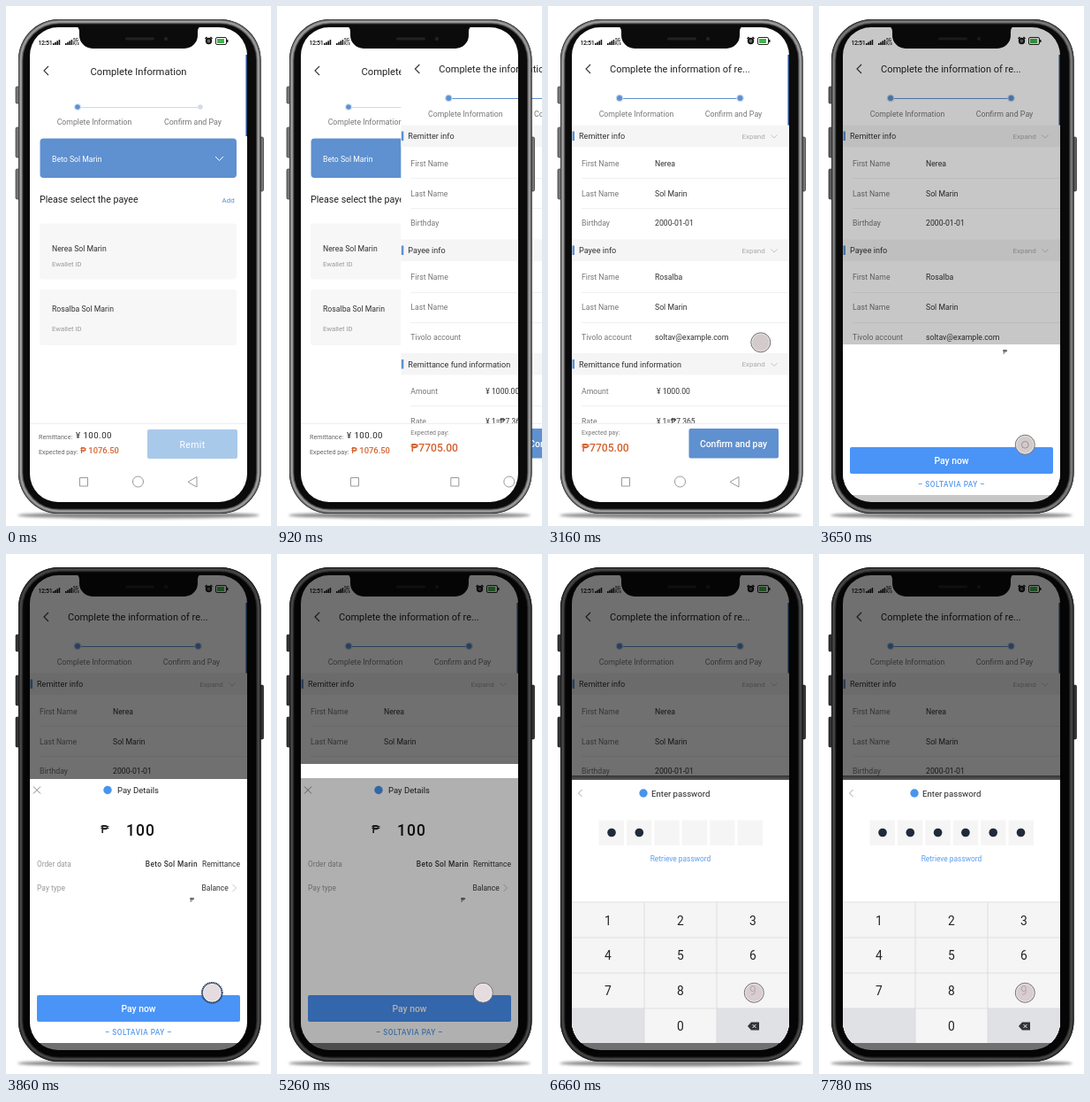
These frames come from a looping animation (300x587 px, 8000 ms). An HTML page:

```html
<!DOCTYPE html>
<html lang="en">
<head>
<meta charset="utf-8">
<title>Remittance demo</title>
<style>
html, body { margin: 0; width: 100%; height: 100%; overflow: hidden; background: #fff; }
svg { display: block; width: 300px; height: 587px; font-family: Roboto, Arial, sans-serif; }
</style>
</head>
<body>
<svg id="stage" viewBox="0 0 300 587"></svg>
<script>
const BLUE = '#5f90cf', ORANGE = '#d4622f';
const FULL = 'Beto Sol Marin', LAST = 'Sol Marin';

// markup helpers
const text = (x, y, s, size, fill = '#333', extra = '') =>
  `<text x="${x}" y="${y}" font-size="${size}" fill="${fill}" ${extra}>${s}</text>`;
const mid = 'text-anchor="middle"', end = 'text-anchor="end"', medium = 'font-weight="500"';
const rect = (x, y, w, h, fill, extra = '') =>
  `<rect x="${x}" y="${y}" width="${w}" height="${h}" fill="${fill}" ${extra}/>`;
const disc = (x, y, r, fill, extra = '') =>
  `<circle cx="${x}" cy="${y}" r="${r}" fill="${fill}" ${extra}/>`;
const line = (d, stroke, w = 1) =>
  `<path d="${d}" fill="none" stroke="${stroke}" stroke-width="${w}"/>`;
const round = (x, y, w, h, r) =>
  `M${x + r} ${y}h${w - 2 * r}a${r} ${r} 0 0 1 ${r} ${r}v${h - 2 * r}a${r} ${r} 0 0 1 ${-r} ${r}` +
  `h${2 * r - w}a${r} ${r} 0 0 1 ${-r} ${-r}v${2 * r - h}a${r} ${r} 0 0 1 ${r} ${-r}z`;

function statusBar() {
  let s = text(36.5, 43.5, '12:51', 7, '#111', medium + ' letter-spacing="-.4"');
  for (const x of [53, 67]) {
    for (let i = 0; i < 4; i++) s += rect(x + i * 2.2, 42 - i * 1.3, 1.6, 2 + i * 1.3, '#111');
  }
  return s + text(76, 40, '5G', 4.8, '#111', medium) + text(76, 44.3, 'K/s', 4.5, '#111', medium) +
    disc(229.5, 39.5, 2.8, '#666', 'stroke="#111" stroke-width="1.8"') +
    line('M225.5 37l2-2M233.5 37l-2-2', '#111', 1.4) +
    rect(237.5, 35.5, 12, 8, '#fff', 'rx="1.5" stroke="#222"') +
    rect(239, 37, 8, 5, '#3fb54a') + rect(250, 38, 1.5, 3, '#222');
}

const navBar = () =>
  line('M83.5 532.5h9v9.5h-9zM216 531.5v11.5l-10-5.7z', '#999') +
  disc(149.5, 537, 6, 'none', 'stroke="#999"');

const pageBase = backY => rect(27, 24, 246, 536, '#fff') + statusBar() + navBar() +
  rect(271.5, 55, 2, 92, '#244c86') + line(`M48 ${backY - 5}l-5 5 5 5`, '#333', 1.1);

function payeePage() {
  const card = (y, name, nameY, idY) => rect(38, y, 223, 63, '#f7f7f7', 'rx="3"') +
    text(52, nameY, name, 8.7) + text(52, idY, 'Ewallet ID', 7.7, '#999');
  return pageBase(73) + text(150, 77.5, 'Complete Information', 11.2, '#222', mid) +
    line('M81 114.5H220', '#cfd9e6') + disc(81, 114, 4, '#d5e4f5') + disc(81, 114, 2.8, BLUE) +
    disc(220, 114, 2.7, '#d3dbe5') +
    text(100, 134, 'Complete Information', 8.7, '#777', mid) +
    text(211.5, 134, 'Confirm and Pay', 8.9, '#777', mid) +
    rect(38.5, 149.5, 222.5, 44.5, BLUE, 'rx="4"') + text(52, 175.5, FULL, 8.7, '#fff') +
    line('M237 170l4.5 4.5 4.5-4.5', '#fff') +
    text(38, 222, 'Please select the payee', 10.7, '#222') + text(244.5, 221.5, 'Add', 8, BLUE) +
    card(245.5, 'Nerea ' + LAST, 277, 293.5) + card(320, 'Rosalba ' + LAST, 345, 367) +
    line('M27 471.5H273', '#eee') +
    text(37, 488.5, 'Remittance:', 7.2, '#666') +
    text(79, 488.3, '¥ 100.00', 9.6, '#222', 'letter-spacing=".5"') +
    text(37, 505.5, 'Expected pay:', 7.2, '#666') +
    text(84, 504.5, '₱ 1076.50', 9.4, ORANGE, medium) +
    rect(160, 478, 102, 33, '#a9c9ea', 'rx="2"') +
    text(211, 498.5, 'Remit', 10.5, '#fff', mid + ' letter-spacing=".4"');
}

const fields = [
  [180.5, 'First Name', 'Nerea'], [214.5, 'Last Name', LAST], [248, 'Birthday', '2000-01-01'],
  [309, 'First Name', 'Rosalba'], [343, 'Last Name', LAST],
  [377, 'Tivolo account', 'soltav@example.com']
];

function confirmPage() {
  const section = (y, name) => rect(27, y, 246, 24.5, '#f5f5f5') + rect(27.5, y + 7, 2.5, 10.5, BLUE) +
    text(35, y + 15.5, name, 9.1) + text(219.5, y + 15, 'Expand', 8, '#aaa') +
    line(`M252.5 ${y + 11}l3.5 3.5 3.5-3.5`, '#c4c4c4');
  let s = pageBase(71) + text(70, 75, 'Complete the information of re...', 11, '#222') +
    line('M81 104.5H218', BLUE);
  for (const x of [81, 217.5]) s += disc(x, 104, 4.3, '#c4d8f0') + disc(x, 104, 3, BLUE);
  s += text(100, 124.5, 'Complete Information', 8.7, '#777', mid) +
    text(210, 124.5, 'Confirm and Pay', 8.8, '#777', mid) +
    section(134.5, 'Remitter info') + section(263.5, 'Payee info') +
    section(392, 'Remittance fund information');
  for (const [y, label] of fields) {
    s += text(38, y, label, 8.7, '#777') + text(121, y, '', 8.7, '#333', 'class="value"');
  }
  for (const y of [194.5, 228.5, 323.5, 357.5, 451.5]) s += line(`M38 ${y}H273`, '#f0f0f0');
  return s + text(38, 437.5, 'Amount', 8.7, '#777') + text(123, 437.5, '¥ 1000.00', 8.6) +
    text(38, 471.5, 'Rate', 8.7, '#777') + text(123, 471.5, '¥ 1=₱7.365', 8.5) +
    rect(27, 471, 246, 46, '#fff') + line('M27 471.5H273', '#eee') +
    text(38, 484, 'Expected pay:', 7, '#777') + text(38, 502.7, '₱7705.00', 12.1, ORANGE, medium) +
    rect(159.5, 477, 101.5, 33.5, BLUE, 'rx="2"') +
    text(210, 498, 'Confirm and pay', 10.4, '#fff', mid + ' ' + medium);
}

const BUTTONS = [[11, 91, 19], [11, 137, 34], [11, 184, 34], [287, 148, 61]];

function phoneFrame() {
  let s = '';
  for (const [x, y, h] of BUTTONS) {
    s += rect(x, y, 4.5, h, '#777', 'rx="1.5" stroke="#333" stroke-width=".7"');
  }
  s += `<path fill="#0b0b0b" fill-rule="evenodd" d="${round(14, 15, 274.5, 558, 46)}${round(27, 24, 246, 536, 32)}"/>`;
  // metal rim, dark at its edges and bright along its middle
  const rim = round(16.7, 17.7, 269.1, 552.6, 43.5);
  for (const [w, c] of [[5.4, '#3a3a3a'], [4, '#666'], [2.6, '#8a8a8a'], [1, '#a8a8a8']]) s += line(rim, c, w);
  return s +
    '<path fill="#0b0b0b" d="M78 23q5 0 5 6v4a15 15 0 0 0 15 15h104a15 15 0 0 0 15-15v-4q0-6 5-6z"/>' +
    rect(135, 35.5, 33, 3, '#222', 'rx="1.5"') + disc(181, 37, 2.2, '#1b2230');
}

const paySheet = () => rect(27, 254, 246, 298, '#fff') +
  line('M31 262.5l8 8M39 262.5l-8 8', '#777', .9) +
  disc(115, 266.5, 4.7, '#4795ea') + text(126, 270, 'Pay Details', 9.5, '#222') +
  text(107, 315, '₱', 13, '#222', medium) +
  text(136, 318, '100', 17.5, '#111', medium + ' letter-spacing="1"') +
  text(35, 352.5, 'Order data', 8.3, '#999') +
  text(217, 352.5, FULL, 8.4, '#333', end + ' ' + medium + ' letter-spacing=".3"') +
  text(265, 352.5, 'Remittance', 8.5, '#333', end) +
  text(35, 380, 'Pay type', 8.5, '#999') + text(221.5, 380, 'Balance', 8.5) +
  line('M256.5 373l4 4-4 4', '#bbb', .9) + text(208, 393, '₱', 7, '#555', medium) +
  rect(35, 498, 230, 30, '#4a94f7', 'rx="2"') +
  text(150, 517, 'Pay now', 10.4, '#fff', mid + ' ' + medium) +
  text(150, 543, '– SOLTAVIA PAY –', 8.2, '#5b9cec', mid + ' ' + medium + ' letter-spacing=".5"');

function passwordSheet() {
  let s = rect(27, 255, 246, 297, '#fff') + line('M38.5 266l-4 4 4 4', '#999', .9) +
    disc(108, 270, 4.7, '#4795ea') + text(117, 274, 'Enter password', 9.6, '#222') +
    text(150, 347, 'Retrieve password', 8.4, '#5b9cec', mid) +
    rect(27, 393, 246, 159, '#f5f5f6') + rect(27, 513, 82, 39, '#dfe1e5') +
    rect(191, 513, 82, 39, '#dfe1e5') + rect(191, 473, 82, 39.5, '#d6d8dd', 'id="key"');
  for (let i = 0; i < 6; i++) {
    s += rect(57.5 + 31.4 * i, 300.5, 28.5, 28.5, '#f5f5f5') +
      disc(72 + 31.3 * i, 314.5, 4.8, '#1f2a3a', 'class="pin"');
  }
  s += line('M27 393H273M27 433H273M27 473H273M27 513H273M109 393V552M191 393V552', '#dcdcde', .9);
  for (let i = 0; i < 10; i++) {
    const col = i < 9 ? i % 3 : 1, row = Math.floor(i / 3);
    s += text(68 + 82 * col, 418.5 + 39.8 * row, (i + 1) % 10, 13.8, '#222', mid);
  }
  return s + '<path d="M226 533l4-4.5h9v9h-9z" fill="#333"/>' +
    line('M231.5 531l4 4M235.5 531l-4 4', '#fff', .9);
}

const stage = document.getElementById('stage');
stage.innerHTML = `<defs>
  <clipPath id="screen"><path d="${round(27, 24, 246, 536, 32)}"/></clipPath>
  <clipPath id="payClip"><rect id="payWipe" x="27" width="246"/></clipPath>
  <clipPath id="passClip"><rect id="topWipe" x="27" y="255" width="246"/><rect id="padWipe" x="27" y="361" width="246"/></clipPath>
  <linearGradient id="shade" x2="0" y2="1"><stop offset="0" stop-color="#333"/><stop offset="1" stop-color="#5c5c5c"/></linearGradient>
  <filter id="blur" x="-10%" y="-100%" width="120%" height="300%"><feGaussianBlur stdDeviation="1.5"/></filter>
  </defs>
  <ellipse cx="150" cy="575" rx="137" ry="3.6" fill="#888" filter="url(#blur)"/>
  <g>${payeePage()}</g><g id="confirm">${confirmPage()}</g>${phoneFrame()}
  <path id="dim" d="${round(14, 15, 274.5, 558, 46)}${BUTTONS.map(([x, y, h]) => round(x, y, x < 20 ? 3 : 4.5, h, 1)).join('')}"/>
  <g clip-path="url(#screen)">
    ${rect(27, 237, 246, 17, '#fff', 'id="band"')}
    <g clip-path="url(#payClip)">${paySheet()}</g>
    ${rect(27, 253, 246, 307, '#000', 'id="shadeOver"')}
    ${rect(27, 250, 246, 5, 'url(#shade)', 'id="edge"')}
    <g clip-path="url(#passClip)">${passwordSheet()}</g>
  </g>
  <g id="touch">${disc(0, 0, 11, '#ccc', 'id="tip" stroke="#757073"')}
  ${disc(0, 0, 9.9, 'none', 'stroke="#fff" stroke-opacity=".45"')}
  ${disc(0, 0, 0, 'none', 'id="ring"')}</g>`;

const $ = id => document.getElementById(id);
const values = [...document.querySelectorAll('.value')], pins = [...document.querySelectorAll('.pin')];
const set = (id, attrs) => { for (const k in attrs) $(id).setAttribute(k, attrs[k]); };
const clamp = (v, lo = 0, hi = 1) => Math.min(hi, Math.max(lo, v));
const ramp = (t, a, b) => clamp((t - a) / (b - a));
const within = (t, a, b) => t >= a && t < b;

const PULSES = [1340, 3580, 4140], PINS = [6450, 6660, 6870, 7080, 7360, 7710];
const PRESSES = [6450, 7080, 7360, 7710];

function draw(t) {
  set('confirm', {
    transform: `translate(${272 * (1 - ramp(t, 430, 1270))} 0)`,
    visibility: t < 500 ? 'hidden' : 'visible'
  });

  fields.forEach(([, , s], i) => {
    const a = i < 5 ? 1970 + 168 * i : 2810;
    values[i].textContent = s.slice(0, Math.round(s.length * ramp(t, a, a + (i < 5 ? 168 : 350))));
  });

  // first sheet rises while everything behind it darkens
  const pay = t < 3580 ? 0 : Math.min(298, 85 * (t - 3510) / 70);
  set('payWipe', { y: 552 - pay, height: pay });
  set('dim', { opacity: t < 3580 ? 0 : .56 * ramp(t, 3515, 3860) });
  set('band', { opacity: t < 5330 ? ramp(t, 4630, 4770) : 0 });

  // second sheet
  const over = t < 5260 ? 0 : Math.min(.73, .31 + .001 * (t - 5260));
  set('shadeOver', { opacity: over * (1 - ramp(t, 5960, 6100)) });
  set('edge', { opacity: t < 5330 ? 0 : 1 });
  const n = (t - 5540) / 70;
  set('topWipe', { height: clamp(36 * n, 0, 106) });
  set('padWipe', { height: clamp(16 + 88 * (n - 2), 0, 191) });
  pins.forEach((p, i) => p.setAttribute('opacity', t >= PINS[i] ? 1 : 0));
  set('key', { opacity: PRESSES.some(a => within(t, a, a + 70)) ? 1 : 0 });

  // touch pointer
  const p = ramp(t, 2810, 3440), move = p * p * (3 - 2 * p);
  set('touch', {
    transform: `translate(${251.3 - 18 * move} ${218.3 + 277 * move})`,
    opacity: ramp(t, 1270, 1550)
  });
  set('tip', {
    fill: t < 3720 ? '#d3cbcb' : t < 5400 ? '#e4dcde' : t < 6000 ? '#b3a7a9' : 'rgba(212,198,200,.85)'
  });
  const start = PULSES.find(a => within(t, a, a + 420));
  const young = t - start < 140;
  set('ring', start === undefined ? { r: 0, stroke: 'none' } : {
    r: 16 * (t - start + 35) / 440,
    stroke: young ? '#8b8588' : '#27406c',
    'stroke-width': young ? .8 : 1.8,
    'stroke-dasharray': young ? 'none' : '1.4 .6'
  });
}

const began = performance.now();
function tick(now) {
  const t = Math.max(0, now - began) % 8000;
  draw(t < 500 ? 0 : 10 + 70 * Math.floor((t - 10) / 70));
  requestAnimationFrame(tick);
}
draw(0);
requestAnimationFrame(tick);
</script>
</body>
</html>
```
